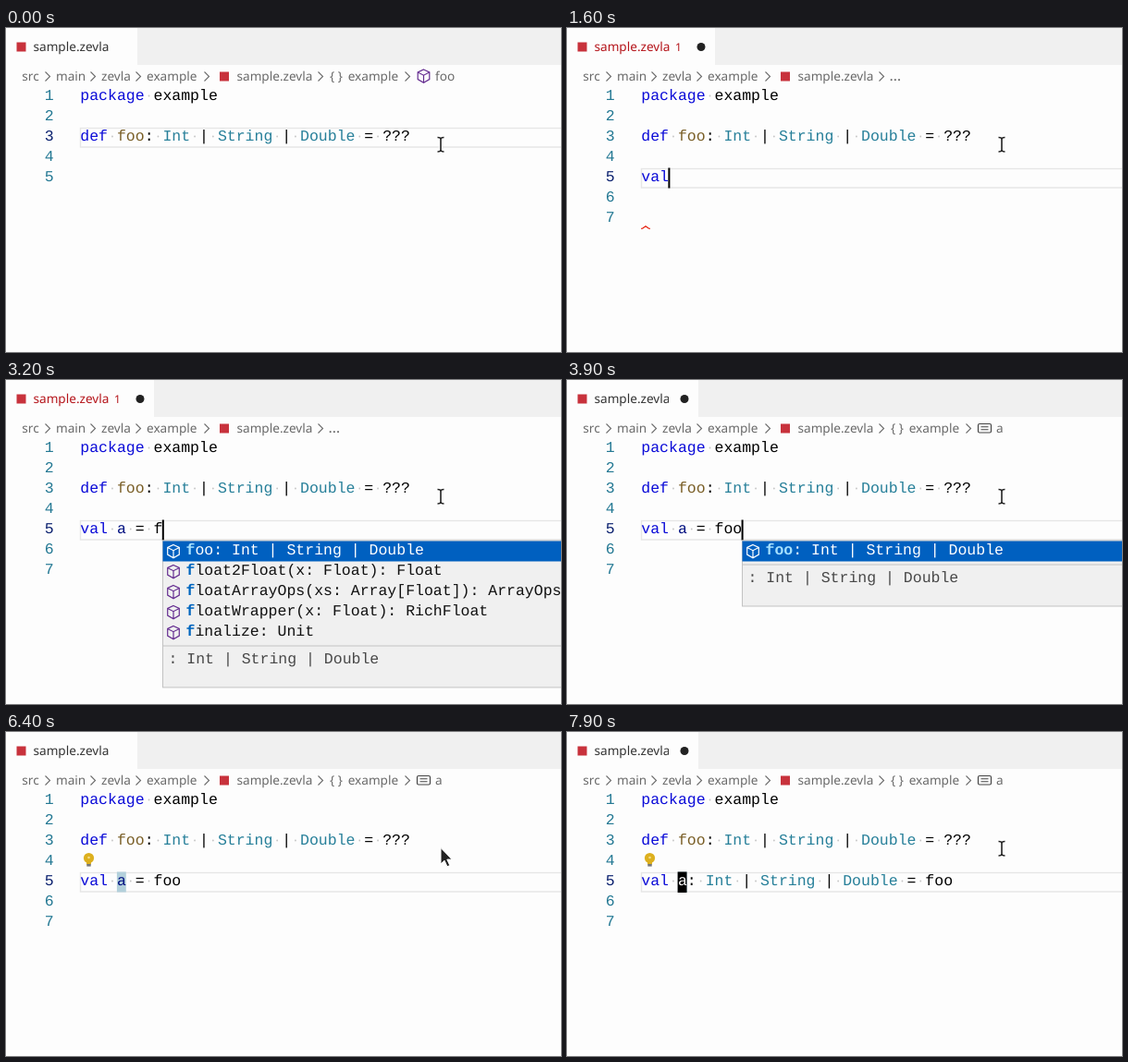
Write an HTML page that moves like this. It is 600x351 px and loops after 8000 ms.

```html
<!DOCTYPE html>
<html lang="en">
<head>
<meta charset="utf-8">
<style>
  html, body { margin: 0; width: 100%; height: 100%; overflow: hidden; background: #fdfdfd; }
  svg { display: block; width: 600px; height: 351px; }
  text { white-space: pre; text-rendering: geometricPrecision; }
  .code { font: 16.5px "Liberation Mono", monospace; }
  .ui { font: 13.6px "Noto Sans", "Open Sans", sans-serif; }
</style>
</head>
<body>
<svg id="stage" viewBox="0 0 600 351"></svg>
<script>
const LOOP = 8000, LEFT = 80.3, CHAR = 9.9, ROW = 22;
const TYPE = 'Int | String | Double';
const FILE = 'sample.zevla';
const RED = '#b5151b', PURPLE = '#652d90';
const COLORS = ['#0a0ad8', '#267f99', '#795e26', '#001080'];
const TOKENS = /\b(package|def|val)\b|\b(Int|String|Double)\b|\b(foo)(?=:)|\b(a)\b/g;
const CHOICES = ['foo: ' + TYPE, 'float2Float(x: Float): Float',
  'floatArrayOps(xs: Array[Float]): ArrayOps', 'floatWrapper(x: Float): RichFloat', 'finalize: Unit'];

// Each step changes part of the editor state from its time (ms) on.
const STEPS = [
  [0, { line: 3, count: 5, code: '', tab: 'saved', crumb: 'foo', caret: '', col: 0, rows: 0, match: 0,
        squiggle: false, bulb: false, mark: false, arrow: false }],
  [100, { line: 4, count: 6, caret: 'bar' }],
  [200, { tab: 'dirty' }],
  [600, { line: 5, count: 7 }],
  [900, { code: 'v' }],
  [1000, { tab: 'error', crumb: '' }],
  [1300, { code: 'va' }],
  [1400, { code: 'val' }],
  [1600, { squiggle: true }],
  [2000, { code: 'val ' }],
  [2300, { code: 'val a' }],
  [2500, { code: 'val a ' }],
  [2600, { code: 'val a =' }],
  [2800, { code: 'val a = ' }],
  [3200, { code: 'val a = f', rows: 5, match: 1, squiggle: false }],
  [3400, { code: 'val a = fo', rows: 1, match: 2, tab: 'dirty' }],
  [3700, { code: 'val a = foo', match: 3, crumb: 'a' }],
  [4200, { rows: 0, caret: 'block', col: 10 }],
  [4900, { tab: 'saved' }],
  ...[9, 8, 7, 6, 5, 4].map((col, i) => [5300 + i * 100, { col }]),
  [5900, { mark: true }],
  [6200, { bulb: true }],
  [6400, { caret: '', arrow: true }],
  [7200, { code: `val a: ${TYPE} = foo`, tab: 'dirty', arrow: false, bulb: false }],
  [7300, { caret: 'block' }],
  [7900, { bulb: true }],
];

const rect = (x, y, w, h, fill, more = '') =>
  `<rect x="${x}" y="${y}" width="${w}" height="${h}" fill="${fill}" ${more}/>`;
const path = (d, stroke, width = 1.2, fill = 'none') =>
  `<path d="${d}" stroke="${stroke}" stroke-width="${width}" fill="${fill}"/>`;
const circle = (x, y, r, fill) => `<circle cx="${x}" cy="${y}" r="${r}" fill="${fill}"/>`;
const text = (x, y, str, fill = '#000', kind = 'code') =>
  `<text class="${kind}" x="${x}" y="${y}" fill="${fill}">${str}</text>`;
const span = (str, fill, more = '') => `<tspan fill="${fill}" ${more}>${str}</tspan>`;
const lineTop = n => 63.5 + ROW * (n - 1);
const baseline = n => 78 + ROW * (n - 1);
const colX = c => LEFT + c * CHAR;

function cube(x, y, color) {
  return `<g transform="translate(${x} ${y})">` +
    path('M0-7L6.3-4V3.6L0 7.2L-6.3 3.6V-4ZM-6.3-4L0-.8L6.3-4M0-.8V7.2', color) + '</g>';
}

function codeLine(n, str) {
  const dots = [...str].map((c, i) =>
    c === ' ' ? circle(colX(i + .5), baseline(n) - 4.5, .9, '#c4c4c4') : '').join('');
  const colored = str.replace(TOKENS, (word, ...groups) =>
    span(word, COLORS[groups.slice(0, 4).findIndex(Boolean)]));
  return dots + text(LEFT, baseline(n), colored);
}

function tabBar({ tab }) {
  const error = tab === 'error', width = error ? 160 : 142;
  let out = rect(0, 0, 600, 40, '#f0f0f0') + rect(0, 0, width, 40, '#fdfdfd') +
    rect(11.5, 15.5, 10, 10, '#c8323c') + text(29.5, 25, FILE, error ? RED : '#333', 'ui');
  if (error) out += text(117, 25, '<tspan font-size="12">1</tspan>', RED, 'ui');
  if (tab === 'dirty') out += rect(110, 5, 32, 30, '#fdfdfd');
  if (tab !== 'saved') out += circle(width - 15, 20.5, 4.5, '#222');
  return out;
}

function breadcrumbs({ crumb }) {
  const gray = '#6a6a6a';
  const label = (x, str) => text(x, 57, str, gray, 'ui');
  const chevron = x => path(`M${x - 2.5} 47.5l5 5l-5 5`, gray, 1.1);
  let out = label(17.3, 'src') + label(54, 'main') + label(103, 'zevla') + label(152, 'example') +
    rect(231, 47.5, 10, 10, '#c8323c') + label(249.5, FILE) + [45, 94, 143, 217, 340].map(chevron).join('');
  if (!crumb) return out + label(348.5, '<tspan font-size="16">…</tspan>');
  out += label(350, '{ }') + label(369.7, 'example') + chevron(434) + label(464, crumb);
  return out + (crumb === 'foo' ? cube(451.5, 52, PURPLE) :
    rect(444.5, 47.5, 14, 9.5, 'none', 'rx="1.5" stroke="#444" stroke-width="1.2"') +
    path('M447.5 50.8h8M447.5 53.8h8', '#444', 1.1));
}

function popup({ rows, match, code }) {
  const x = Math.round(colX(code.length)) + .5, y = 174, split = y + 4 + ROW * rows;
  let out = rect(x, y, 440, split + 45 - y, '#f0f0f0', 'stroke="#c2c2c2"') +
    rect(x, y + .5, 440, ROW, '#0060c0') + path(`M${x} ${split}H600`, '#c2c2c2', 1);
  for (let i = 0; i < rows; i++) {
    const str = CHOICES[i];
    out += cube(x + 11.5, 185.5 + ROW * i, i ? PURPLE : '#fff') +
      text(x + 25, 189 + ROW * i,
        span(str.slice(0, match), i ? '#0066bf' : '#a5e0ff', 'font-weight="bold"') + str.slice(match),
        i ? '#111' : '#fff');
  }
  return out + text(x + 6, split + 19, ': ' + TYPE, '#484848');
}

function pointer(arrow) {
  if (arrow) return path('M470 125.5v17.5l4-3.8l3 6.6l2.8-1.3l-3-6.4h5.4z', '#fff', 1, '#222');
  const beam = 'M466.5 118.5q3.5 0 3.5 2q0-2 3.5-2M470 120v13M466.5 134q3.5 0 3.5-2q0 2 3.5 2';
  return path(beam, '#fff', 3) + path(beam, '#222', 1.6);
}

function draw(s) {
  const top = lineTop(s.line);
  let out = rect(0, 0, 600, 351, '#fdfdfd') + tabBar(s) + breadcrumbs(s) +
    rect(80.5, top + 1, 530, 20.5, 'none', 'stroke="#e6e6e6" stroke-width="1.4"');
  for (let n = 1; n <= s.count; n++)
    out += text(41.8, baseline(n), n, n === s.line ? '#0b216f' : '#237893');
  if (s.mark) out += rect(colX(4), top, CHAR, ROW, '#b3d0db');
  out += codeLine(1, 'package example') + codeLine(3, `def foo: ${TYPE} = ???`) + codeLine(5, s.code);
  if (s.squiggle) out += path('M80 217.3h1.5l3.5-2.6l3.5 2.6h1.5', '#e51400', 1.1);
  if (s.bulb) out += circle(89.5, 136.5, 5.6, '#ddb01e') + rect(87, 140, 5, 3.5, '#ddb01e') +
    rect(87.3, 143, 4.4, 2.6, '#777') + circle(89.5, 136, 1.3, '#f3dc8a');
  if (s.caret === 'bar') out += rect(colX(s.code.length) - .6, top, 2, ROW, '#000');
  if (s.caret === 'block') out += rect(colX(s.col) - .3, top, CHAR, ROW + .5, '#000') +
    text(colX(s.col), baseline(s.line), s.code[s.col], '#fff');
  if (s.rows) out += popup(s);
  return out + pointer(s.arrow);
}

const stage = document.getElementById('stage');
const start = performance.now();
let shown = 0;
function tick() {
  const time = (performance.now() - start) % LOOP;
  const past = STEPS.filter(([at]) => at <= time);
  if (past.length !== shown) {
    shown = past.length;
    stage.innerHTML = draw(Object.assign({}, ...past.map(([, change]) => change)));
  }
  requestAnimationFrame(tick);
}
tick();
</script>
</body>
</html>
```
